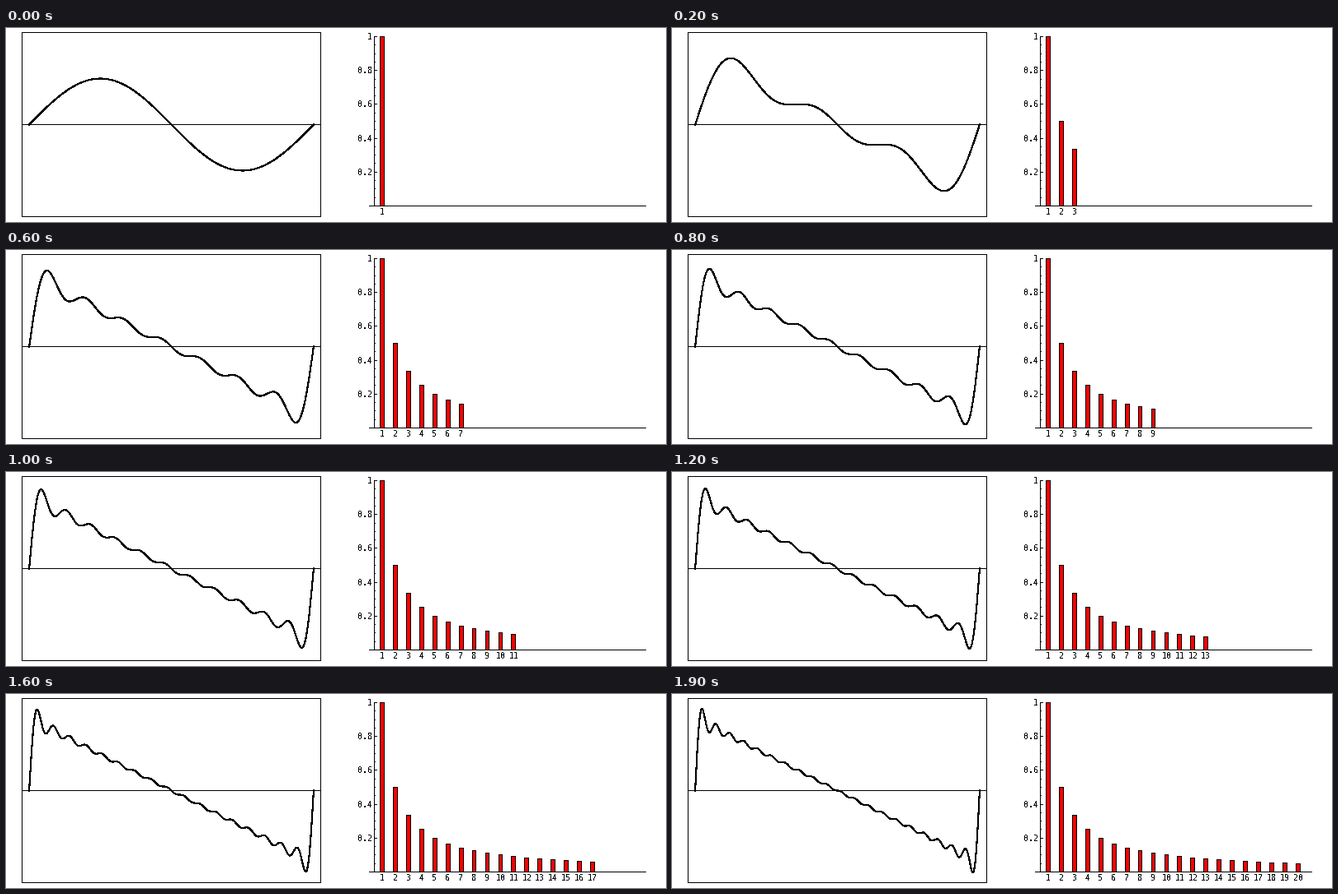
Write a matplotlib script that moves like this. It is 800 px wide and 236 px high and loops after 2000 ms.

```python
import numpy as np
import matplotlib.pyplot as plt
from matplotlib.animation import FuncAnimation
from matplotlib.patches import Rectangle

W, H, DPI = 800, 236, 64
TERMS = 20
PX = 72 / DPI  # points per pixel

fig = plt.figure(figsize=(W / DPI, H / DPI), dpi=DPI, facecolor="white")
ax = fig.add_axes([0, 0, 1, 1])
ax.set_xlim(0, W)
ax.set_ylim(H, 0)
ax.axis("off")


def block(x0, y0, x1, y1, color="black"):
    """Fill the pixels x0..x1, y0..y1, both ends included."""
    return ax.add_patch(Rectangle((x0, y0), x1 - x0 + 1, y1 - y0 + 1, fc=color,
                                  lw=0, antialiased=False, snap=False))


def label(x, y, text, ha):
    return ax.text(x, y, text, ha=ha, va="baseline", fontsize=10 * PX,
                   family="DejaVu Sans Mono", antialiased=False)


# Wave panel
block(19, 5, 381, 229)
block(20, 6, 380, 228, "white")
block(19, 117, 381, 117)
phase = np.linspace(0, 2 * np.pi, 1200)
wave_x = np.linspace(28.1, 372.9, phase.size)
wave, = ax.plot([], [], color="black", lw=1.1 * PX, antialiased=False, snap=False)

# Spectrum axes
BASE, UNIT = 216, 206
block(440, BASE, 775, BASE)
block(446, 10, 446, BASE)
for i in range(1, 21):
    y = round(BASE - UNIT * i / 20)
    major = i % 4 == 0
    block(447, y, 449 if major else 447, y)
    if major:
        label(444, y + 4, f"{i / 20:g}", "right")


def make_bar(k):
    shift = 15.94 * (k - 1)
    left, right = round(453.1 + shift), round(457.9 + shift)
    top = round(BASE - UNIT / k)
    return (block(left, top, right, BASE),
            block(left + 1, top + 1, right - 1, BASE - 1, "red"),
            label(456 + shift, 227, str(k), "center"))


bars = [make_bar(k) for k in range(1, TERMS + 1)]


def draw(frame):
    n = frame + 1
    total = sum(np.sin(k * phase) / k for k in range(1, n + 1))
    wave.set_data(wave_x, 117.5 - 56 * total)
    for k, parts in enumerate(bars, 1):
        for part in parts:
            part.set_visible(k <= n)
    return [wave]


anim = FuncAnimation(fig, draw, frames=TERMS, interval=100, repeat=True,
                     init_func=lambda: draw(0))
plt.show()
```
